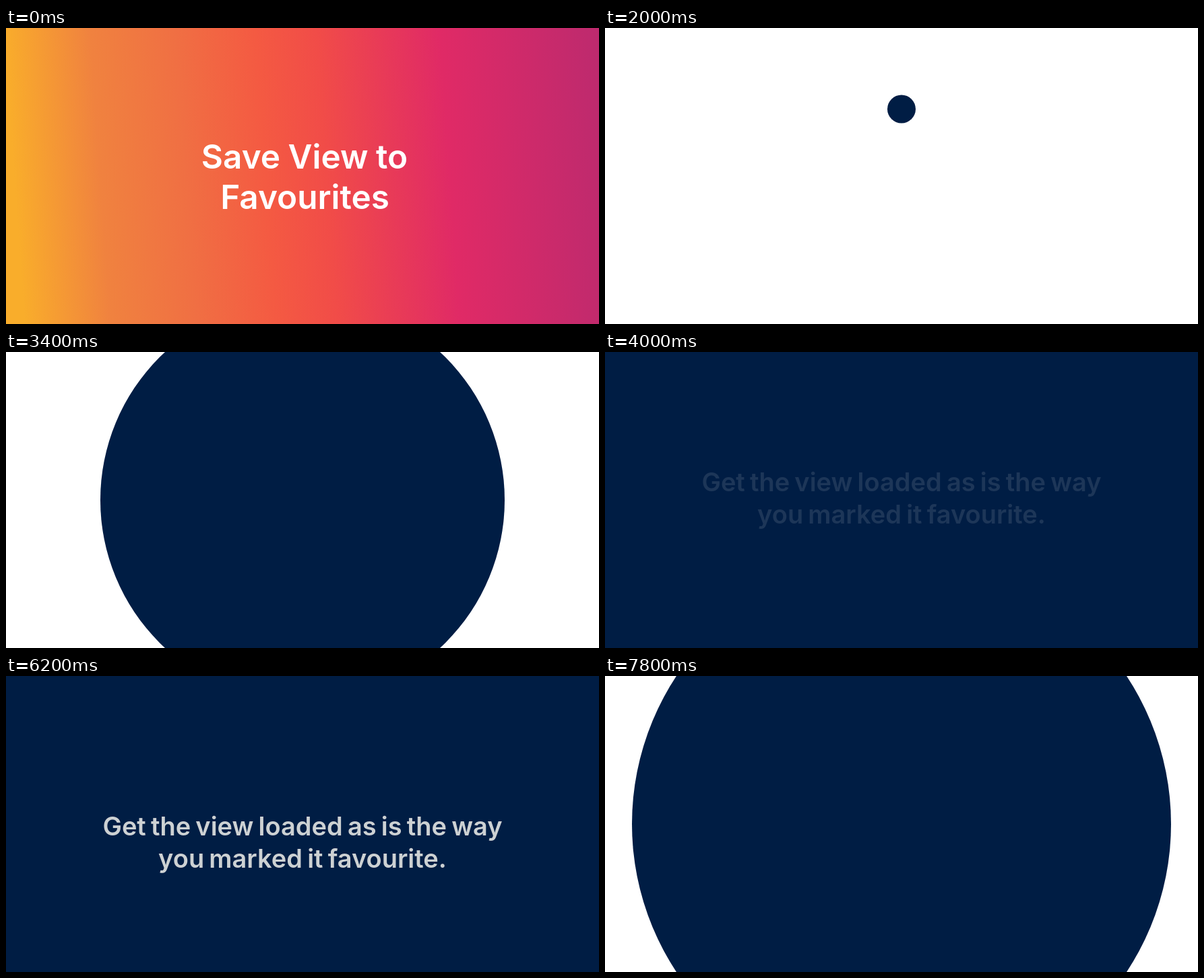
An HTML page for the animation above (8000 ms loop, 880x440 px).

```html
<!DOCTYPE html>
<html lang="en">
<head>
<meta charset="utf-8">
<title>Save View to Favourites</title>
<style>
  html, body { margin: 0; width: 100%; height: 100%; overflow: hidden; background: #fff; }
  #stage { position: relative; width: 880px; height: 440px; overflow: hidden; background: #fff; }
  #intro {
    position: absolute; inset: 0;
    background: linear-gradient(86deg, #f9ad2b 3%, #f0823f 17%, #f06f43 31%,
      #f45a42 44%, #f14c48 54%, #e02a66 74%, #bd2a6e);
  }
  svg { position: absolute; left: 0; top: 0; }
  text { font-family: Inter, "Open Sans", sans-serif; font-weight: 600; text-anchor: middle; }
  .title { font-size: 49.5px; word-spacing: -1px; fill: #fff; }
  #note { font-size: 38px; word-spacing: -2.4px; fill: #ebebe8; }
</style>
</head>
<body>
<div id="stage">
  <div id="intro">
    <svg width="880" height="440" class="title">
      <text x="443" y="208.5">Save View to</text>
      <text x="443.5" y="268.5">Favourites</text>
    </svg>
  </div>
  <svg id="scene" width="880" height="440">
    <circle id="ball" cx="440" fill="#001d44"/>
    <g id="note">
      <text x="440" y="206.5">Get the view loaded as is the way</text>
      <text x="440" y="254.5">you marked it favourite.</text>
    </g>
  </svg>
</div>
<script>
const LOOP = 8000, STEP = 200;
const INTRO_END = 1200, DROP_END = 2800, SHRINK_START = 7600;
const GROWTH = 0.5, SLIDE = 0.0875; // px per ms
const SMALL = 21, FULL = 500;       // ball radius

const el = id => document.getElementById(id);
const intro = el('intro'), scene = el('scene'), ball = el('ball'), note = el('note');

const clamp = (v, lo, hi) => Math.min(hi, Math.max(lo, v));
const ramp = (t, from, to) => clamp((t - from) / (to - from), 0, 1);

function draw(now) {
  const t = Math.floor((now % LOOP) / STEP) * STEP;
  const isIntro = t < INTRO_END;
  intro.style.display = isIntro ? 'block' : 'none';
  scene.style.display = isIntro ? 'none' : 'block';

  const grown = clamp((t - DROP_END) * GROWTH, SMALL, FULL);
  const shrunk = Math.max(0, t - SHRINK_START) * GROWTH;
  ball.setAttribute('cy', SMALL + 199 * ramp(t, INTRO_END, DROP_END));
  ball.setAttribute('r', grown - shrunk);

  const alpha = ramp(t, 3750, 5800) - ramp(t, 6000, SHRINK_START);
  const shift = Math.max(0, t - 5857) * SLIDE;
  note.setAttribute('opacity', alpha);
  note.setAttribute('transform', `translate(0 ${shift})`);
}

const start = performance.now();
function tick() {
  draw(performance.now() - start);
  requestAnimationFrame(tick);
}
tick();
</script>
</body>
</html>
```
